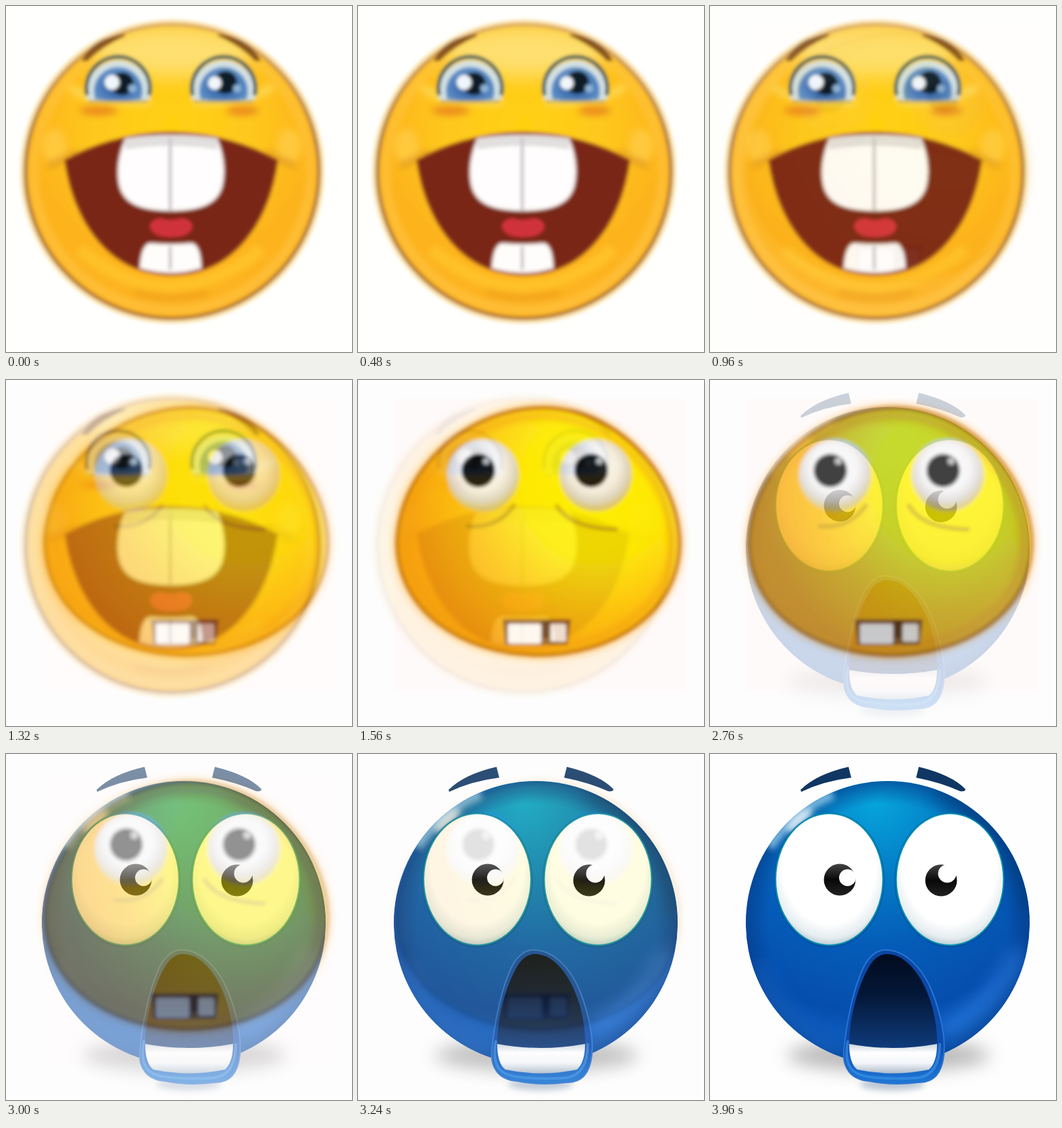
Recreate the animation shown at these times as an HTML page. Size 512 px wide and 512 px high, loop 4080 ms.

```html
<!DOCTYPE html>
<html lang="en">
<head>
<meta charset="utf-8">
<title>Three faces</title>
<style>
  html, body { margin: 0; width: 100%; height: 100%; overflow: hidden; background: #fefefe; }
  svg { display: block; width: 100vw; height: 100vh; }
</style>
</head>
<body>
<svg viewBox="0 0 512 512">
  <defs>
    <filter id="soft" x="-20%" y="-20%" width="140%" height="140%"><feGaussianBlur stdDeviation="2.6"/></filter>
    <filter id="haze" x="-50%" y="-50%" width="200%" height="200%"><feGaussianBlur stdDeviation="5"/></filter>
    <filter id="fog" x="-50%" y="-80%" width="200%" height="260%"><feGaussianBlur stdDeviation="13"/></filter>

    <radialGradient id="laughSkin" cx=".5" cy=".34" r=".66">
      <stop offset="0" stop-color="#ffd010"/><stop offset=".4" stop-color="#fec81e"/>
      <stop offset=".75" stop-color="#fdb31c"/><stop offset="1" stop-color="#fdb425"/>
    </radialGradient>
    <linearGradient id="laughRim" x2="0" y2="1">
      <stop offset="0" stop-color="#dca650"/><stop offset=".4" stop-color="#b5803c"/><stop offset="1" stop-color="#b97c2c"/>
    </linearGradient>
    <radialGradient id="iris" cy=".6">
      <stop offset="0" stop-color="#2a5590"/><stop offset=".65" stop-color="#4879b8"/><stop offset="1" stop-color="#5f8fc4"/>
    </radialGradient>

    <radialGradient id="dazedSkin" gradientUnits="userSpaceOnUse" cx="355" cy="155" r="280">
      <stop offset="0" stop-color="#fff600"/><stop offset=".4" stop-color="#fdec06"/>
      <stop offset=".7" stop-color="#fdc10c"/><stop offset="1" stop-color="#f7a00a"/>
    </radialGradient>
    <radialGradient id="ball" cx=".48" cy=".4" r=".58">
      <stop offset="0" stop-color="#fff"/><stop offset=".55" stop-color="#f6f4f5"/>
      <stop offset=".8" stop-color="#dcd8d4"/><stop offset="1" stop-color="#d8c470"/>
    </radialGradient>

    <radialGradient id="blueSkin" gradientUnits="userSpaceOnUse" cx="245" cy="70" r="390">
      <stop offset="0" stop-color="#06a5dc"/><stop offset=".28" stop-color="#047cc6"/>
      <stop offset=".55" stop-color="#055cb8"/><stop offset=".8" stop-color="#064eae"/><stop offset="1" stop-color="#1467cc"/>
    </radialGradient>
    <radialGradient id="blueEdge">
      <stop offset=".84" stop-color="#053d8a" stop-opacity="0"/><stop offset="1" stop-color="#053d8a" stop-opacity=".65"/>
    </radialGradient>
    <radialGradient id="white" cx=".5" cy=".4" r=".62">
      <stop offset=".7" stop-color="#fff"/><stop offset=".88" stop-color="#e6edf0"/><stop offset="1" stop-color="#a9c2cb"/>
    </radialGradient>
    <linearGradient id="pupil" x2="0" y2="1"><stop offset="0" stop-color="#444"/><stop offset=".5" stop-color="#080808"/><stop offset="1" stop-color="#222"/></linearGradient>
    <linearGradient id="throat" x2="0" y2="1"><stop offset="0" stop-color="#020b1e"/><stop offset=".45" stop-color="#04183a"/><stop offset="1" stop-color="#0f3c7c"/></linearGradient>
    <linearGradient id="lip" x2="0" y2="1"><stop offset="0" stop-color="#0a47a4"/><stop offset=".7" stop-color="#0c4cae"/><stop offset="1" stop-color="#1f78d6"/></linearGradient>
    <linearGradient id="teeth" x2="0" y2="1"><stop offset="0" stop-color="#c9d4de"/><stop offset=".3" stop-color="#fff"/><stop offset=".65" stop-color="#f3f6f9"/><stop offset="1" stop-color="#aebccb"/></linearGradient>
    <clipPath id="blueDisc"><circle cx="263" cy="250" r="210"/></clipPath>
    <clipPath id="laughDisc"><circle cx="246" cy="245" r="216"/></clipPath>

    <g id="laughEye">
      <path d="M-46 22A47 47 0 1 1 46 22Q0 28-46 22Z" fill="#d3e1e4"/>
      <path d="M-34 22A36 36 0 1 1 34 22Q0 28-34 22Z" fill="url(#iris)"/>
      <path d="M-46 16A47 47 0 1 1 46 16" fill="none" stroke="#4a5f5c" stroke-width="6"/>
      <path d="M-44 25Q0 27 44 25" fill="none" stroke="#c9b45c" stroke-width="4"/>
    </g>
    <g id="dazedEye">
      <circle r="53" fill="url(#ball)"/>
      <circle cx="-7" cy="-7" r="25" fill="#0c0b0a"/>
      <circle cx="5" cy="-21" r="5" fill="#b9b9b9"/>
    </g>
    <path id="dazedBody" d="M58 242C60 130 165 41 272 41C382 41 475 140 476 242C475 345 375 407 267 407C150 405 60 340 58 242Z"/>
    <g id="blueEye">
      <ellipse rx="82" ry="100" cy="1" fill="#04448f" opacity=".45"/>
      <ellipse rx="79.5" ry="97.5" fill="url(#white)" stroke="#068fae" stroke-width="2"/>
    </g>
  </defs>

  <g id="laugh">
    <rect width="512" height="512" fill="#fffffd"/>
    <g filter="url(#soft)">
      <circle cx="246" cy="245" r="221" fill="none" stroke="#fbe3ae" stroke-width="8"/>
      <circle cx="246" cy="245" r="217" fill="url(#laughSkin)" stroke="url(#laughRim)" stroke-width="6"/>
      <g filter="url(#haze)" clip-path="url(#laughDisc)">
        <circle cx="246" cy="245" r="205" fill="none" stroke="#ffc846" stroke-width="10" opacity=".7"/>
        <ellipse cx="246" cy="68" rx="118" ry="36" fill="#fee070" filter="url(#fog)"/>
        <path d="M95 120Q120 144 215 142M276 142Q350 146 395 120" fill="none" stroke="#fed955" stroke-width="10"/>
        <ellipse cx="72" cy="208" rx="17" ry="26" fill="#ffc93e"/>
        <ellipse cx="419" cy="208" rx="17" ry="26" fill="#ffc93e"/>
        <path d="M110 360Q240 470 378 360" fill="none" stroke="#ffc22a" stroke-width="18"/>
        <path d="M190 424Q245 438 300 424" fill="none" stroke="#f09e18" stroke-width="8"/>
        <path d="M62 236Q85 228 105 216M428 236Q405 228 385 216" fill="none" stroke="#e29a1c" stroke-width="8"/>
      </g>
      <path d="M87 228C122 208 180 187 244 187C308 187 366 208 402 228C390 315 340 398 245 398C150 398 99 315 87 228Z" fill="#7a2713" stroke="#b5651b" stroke-width="3"/>
      <g stroke="#d3b9b0" stroke-width="3">
        <path d="M177 196Q244 186 312 196C321 215 325 240 321 262C316 292 290 303 244 303C198 303 172 292 167 262C163 240 168 215 177 196Z" fill="#fffdfd"/>
        <path d="M198 388Q200 352 214 351Q244 354 274 351Q288 352 289 388Q245 402 198 388Z" fill="#fffdfb"/>
      </g>
      <path d="M176 205Q244 194 313 205" fill="none" stroke="#d9d6d6" stroke-width="15" opacity=".75"/>
      <path d="M243 195V302M243 356V390" stroke="#cdc8cc" stroke-width="5"/>
      <path d="M213 327Q214 315 229 314Q244 319 259 314Q275 315 276 327Q273 342 244 342Q217 342 213 327Z" fill="#d0323a"/>
      <path d="M114 80Q130 47 176 43Q142 58 120 80ZM375 80Q358 47 314 43Q348 58 369 80Z" fill="#8a551e" stroke="#8a551e" stroke-width="3"/>
      <use href="#laughEye" x="166" y="116"/>
      <use href="#laughEye" x="322" y="116"/>
      <g fill="#101a28"><circle cx="172" cy="115" r="17"/><circle cx="325" cy="113" r="17"/></g>
      <g fill="#f1f6fb"><circle cx="157" cy="113" r="11"/><circle cx="309" cy="114" r="10"/></g>
      <g fill="#8fb4d8"><circle cx="187" cy="122" r="6"/><circle cx="342" cy="122" r="6"/></g>
      <g fill="#ea8a1c" filter="url(#haze)"><ellipse cx="137" cy="155" rx="28" ry="7"/><ellipse cx="350" cy="155" rx="24" ry="7"/></g>
    </g>
  </g>

  <g id="dazed">
    <rect width="512" height="512" fill="#fdfdfd"/>
    <rect x="54" y="28" width="433" height="431" fill="#fffafa"/>
    <g filter="url(#soft)">
      <use href="#dazedBody" fill="none" stroke="#ffd391" stroke-width="13" filter="url(#haze)"/>
      <use href="#dazedBody" fill="url(#dazedSkin)" stroke="#d08412" stroke-width="7"/>
      <path d="M69 242C71 140 170 53 272 53C376 53 464 146 465 242C464 336 370 396 267 396C156 394 71 333 69 242Z" fill="none" stroke="#f29b0a" stroke-width="9" opacity=".65" filter="url(#haze)"/>
      <path d="M160 216Q205 222 232 184M293 184Q313 220 384 221" fill="none" stroke="#b88c0a" stroke-width="6" opacity=".6"/>
      <use href="#dazedEye" x="185" y="141"/>
      <use href="#dazedEye" x="352" y="141"/>
      <path d="M214 354H315L310 392H218Z" fill="#96601a"/>
      <rect x="222" y="361" width="49" height="29" rx="3" fill="#fff8ee"/>
      <path d="M272 356H285V382H272Z" fill="#6a3a10"/>
      <rect x="285" y="361" width="23" height="26" rx="3" fill="#fff5e6"/>
    </g>
  </g>

  <g id="shock">
    <rect width="512" height="512" fill="#fefefe"/>
    <ellipse cx="264" cy="446" rx="150" ry="24" fill="#777" opacity=".5" filter="url(#fog)"/>
    <ellipse cx="270" cy="489" rx="48" ry="9" fill="#8fa0b8" opacity=".6" filter="url(#haze)"/>
    <circle cx="263" cy="250" r="210" fill="url(#blueSkin)"/>
    <g clip-path="url(#blueDisc)">
      <circle cx="263" cy="250" r="210" fill="url(#blueEdge)"/>
      <path d="M340 52Q462 105 474 235" fill="none" stroke="#063a72" stroke-width="28" opacity=".6" filter="url(#fog)"/>
      <path d="M345 410Q425 370 458 290" fill="none" stroke="#3184ea" stroke-width="24" opacity=".6" filter="url(#fog)"/>
      <path d="M70 310Q100 400 190 440" fill="none" stroke="#1c70d6" stroke-width="24" opacity=".5" filter="url(#fog)"/>
      <path d="M88 138Q126 82 182 60" fill="none" stroke="#b5ecff" stroke-width="14" opacity=".65" filter="url(#haze)"/>
      <ellipse cx="132" cy="98" rx="24" ry="9" transform="rotate(-42 132 98)" fill="#fff" opacity=".75" filter="url(#haze)"/>
    </g>
    <path d="M134 53Q157 30 205 19L209 35Q168 40 135 56ZM309 19Q358 31 378 52Q378 56 370 55Q341 42 305 35Z" fill="#103763"/>
    <use href="#blueEye" x="176.500" y="185.500"/>
    <use href="#blueEye" x="355" y="185.500"/>
    <g fill="url(#pupil)"><circle cx="192" cy="186" r="23.500"/><circle cx="342" cy="187" r="23.500"/></g>
    <g fill="#fff"><circle cx="203.500" cy="183" r="12.500"/><circle cx="351" cy="177" r="13.500"/></g>
    <path d="M258 290C288 289 314 316 328 350C341 382 349 420 346 446C343 472 331 487 308 486Q270 491 236 484C208 482 196 464 198 440C201 402 212 345 229 312Q241 291 258 290Z" fill="url(#lip)" stroke="#2a74d0" stroke-width="2"/>
    <path d="M204 424C197 466 212 475 238 478Q272 482 309 479Q340 474 340 428" fill="none" stroke="#3f96ea" stroke-width="4" opacity=".6"/>
    <path d="M262 296C292 296 317 332 329 375Q337 405 336 432Q270 441 206 430C206 390 219 341 237 312Q247 296 262 296Z" fill="url(#throat)"/>
    <path d="M206 429Q270 441 336 429Q336 456 324 467Q270 478 218 467Q206 458 206 429Z" fill="url(#teeth)"/>
  </g>
</svg>
<script>
  const LOOP = 4080, STEP = 120, FADE = 720;
  const start = performance.now();
  const fades = [["dazed", 925], ["shock", 2605]]
    .map(([id, begin]) => ({ layer: document.getElementById(id), begin }));

  function draw(now) {
    const elapsed = Math.max(0, now - start) % LOOP;
    const time = Math.floor(elapsed / STEP) * STEP;
    for (const { layer, begin } of fades) {
      layer.style.opacity = Math.min(1, Math.max(0, (time - begin) / FADE));
    }
    requestAnimationFrame(draw);
  }
  draw(start);
</script>
</body>
</html>
```
